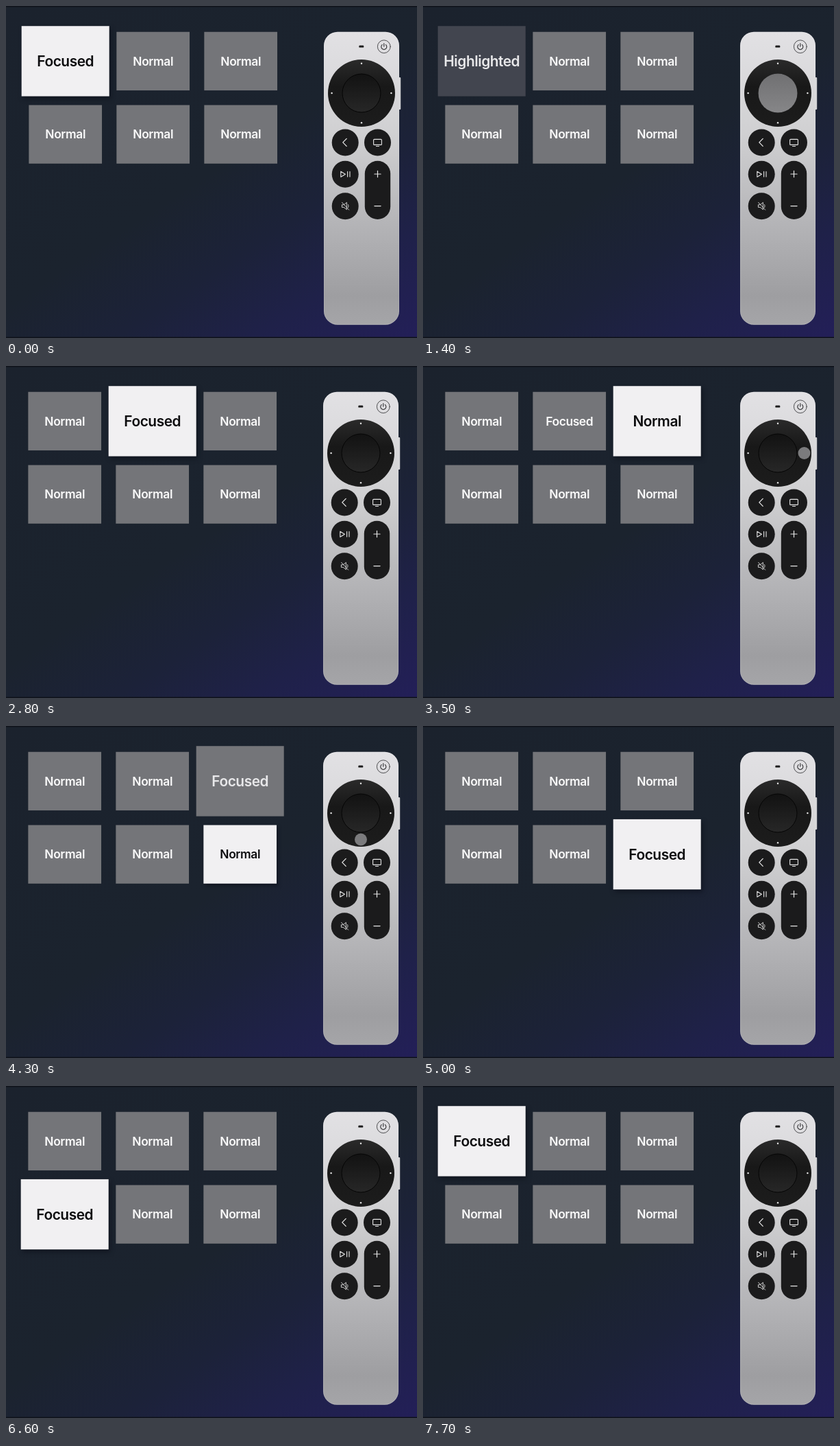
These frames come from a looping animation (600 px wide and 484 px high, 9300 ms). An HTML page:

```html
<!DOCTYPE html>
<html lang="en">
<head>
<meta charset="utf-8">
<title>Focus states</title>
<style>
  html, body { margin: 0; width: 100%; height: 100%; overflow: hidden; background: #1b232d; }
  svg { display: block; width: 600px; height: 484px; }
  text { font: 600 17.4px Inter, "Open Sans", sans-serif; letter-spacing: -.4px; text-anchor: middle; }
  .lit { filter: drop-shadow(2px 3px 2.5px rgba(5, 8, 18, .5)); }
  .icon { fill: none; stroke: #e6e6e6; stroke-width: 1.1; stroke-linecap: round; stroke-linejoin: round; }
</style>
</head>
<body>
<svg viewBox="0 0 600 484">
  <defs>
    <linearGradient id="bg" gradientUnits="userSpaceOnUse" x1="0" y1="0" x2="404" y2="613">
      <stop offset="0" stop-color="#1b222d"/>
      <stop offset=".5" stop-color="#1b232e"/>
      <stop offset=".67" stop-color="#1c2239"/>
      <stop offset=".82" stop-color="#1f2149"/>
      <stop offset="1" stop-color="#231f58"/>
    </linearGradient>
    <linearGradient id="metal" x2="0" y2="1">
      <stop offset="0" stop-color="#e2e1e4"/>
      <stop offset=".35" stop-color="#d0d0d2"/>
      <stop offset=".7" stop-color="#b0b0b3"/>
      <stop offset=".9" stop-color="#9e9ea1"/>
      <stop offset="1" stop-color="#a5a5a8"/>
    </linearGradient>
    <linearGradient id="ring" x2="0" y2="1">
      <stop offset="0" stop-color="#2a2a2a"/>
      <stop offset=".4" stop-color="#181818"/>
      <stop offset="1" stop-color="#1c1c1c"/>
    </linearGradient>
    <linearGradient id="pad" x2="0" y2="1">
      <stop offset="0" stop-color="#121212"/>
      <stop offset="1" stop-color="#272727"/>
    </linearGradient>
    <linearGradient id="press" x2="0" y2="1">
      <stop offset="0" stop-color="#707072"/>
      <stop offset="1" stop-color="#868688"/>
    </linearGradient>
  </defs>
  <rect width="600" height="484" fill="url(#bg)"/>
  <path d="M0 .7H600M0 483.3H600" stroke="#0f121a" stroke-width="1.4"/>
  <g id="scene">
    <g id="grid"></g>
    <g id="remote">
      <rect x="571" y="104" width="4.2" height="47" rx="1" fill="#d4d4d7"/>
      <rect x="463" y="37.7" width="110" height="427" rx="20" fill="url(#metal)"/>
      <rect x="463.4" y="38.1" width="109.2" height="426.2" rx="19.6" fill="none" stroke="#fff" stroke-opacity=".2" stroke-width=".8"/>
      <rect x="514.3" y="57.6" width="7" height="3" rx="1.2" fill="#1c1c1c"/>
      <g fill="none" stroke="#2a2a2c" stroke-linecap="round">
        <circle cx="550.8" cy="59.2" r="9.4" stroke-width=".8"/>
        <path d="M548.2 56.4a4 4 0 1 0 5.2 0M550.8 54.6v4.4" stroke-width="1.1"/>
      </g>
      <circle cx="518" cy="127" r="49" fill="url(#ring)"/>
      <circle cx="518" cy="127" r="28" fill="url(#pad)" stroke="#050505"/>
      <g fill="#e8e8e8">
        <circle cx="518" cy="83.8" r="1.2"/><circle cx="518" cy="170.2" r="1.2"/>
        <circle cx="474.6" cy="127" r="1.2"/><circle cx="561.4" cy="127" r="1.2"/>
      </g>
      <g fill="#1b1b1c">
        <circle cx="494.2" cy="199" r="19.5"/><circle cx="541.5" cy="199" r="19.5"/>
        <circle cx="494.2" cy="245.3" r="19.5"/><circle cx="494.2" cy="291.8" r="19.5"/>
        <rect x="522.8" y="225.8" width="37.4" height="85.2" rx="18.7"/>
      </g>
      <g class="icon">
        <path d="M496.2 193.4l-5.4 5.5 5.4 5.5" stroke-width="1.3"/>
        <path d="M536.6 194.4h9.8q1 0 1 1v6q0 1-1 1h-9.8q-1 0-1-1v-6q0-1 1-1zM539.4 204.5h4.2"/>
        <path d="M487.8 241.2v8l6.6-4zM497.6 241.4v7.6M501 241.4v7.6"/>
        <path d="M536.9 245h9.2M541.5 240.4v9.2M536.9 291.6h9.2" stroke-width="1.2"/>
        <path d="M489.8 289.8h2.4l4.2-3.4v10.4l-4.2-3.4h-2.4zM489.6 286.4l10 10.8M498.6 289.6q1 2 0 4" stroke-width=".9"/>
      </g>
    </g>
    <circle id="click" cx="518" cy="127" r="28.5" fill="url(#press)"/>
    <circle id="tap" r="9" fill="#7b7b7d"/>
  </g>
</svg>
<script>
const LOOP = 9300;
const GREY = '#747579', WHITE = '#f1f0f2';
const $ = id => document.getElementById(id);

// Each move: start, time the labels catch up, from cell, to cell
const moves = [
  [2500, 2800, 0, 1],
  [3400, 3800, 1, 2],
  [4300, 4600, 2, 5],
  [5200, 5500, 5, 4],
  [6200, 6600, 4, 3],
  [7400, 7700, 3, 0]
];

const col = i => i % 3, row = i => Math.floor(i / 3);

function add(parent, tag, attrs) {
  const el = document.createElementNS('http://www.w3.org/2000/svg', tag);
  for (const k in attrs) el.setAttribute(k, attrs[k]);
  return parent.appendChild(el);
}

const cells = Array.from({ length: 6 }, (_, i) => {
  const g = add($('grid'), 'g', {});
  const box = add(g, 'rect', { x: -53.35, y: -42.65, width: 106.7, height: 85.3 });
  const label = add(g, 'text', { y: 6.2 });
  return { g, box, label, x: 85.7 + 128 * col(i), y: 80.4 + 106.7 * row(i) };
});

function paint(cell, text, big, fill, ink) {
  cell.g.setAttribute('transform', `translate(${cell.x} ${cell.y}) scale(${big ? 1.2 : 1})`);
  cell.box.setAttribute('fill', fill);
  cell.box.setAttribute('class', fill === WHITE ? 'lit' : '');
  cell.label.setAttribute('fill', ink);
  if (cell.label.textContent !== text) cell.label.textContent = text;
}

const show = (el, on) => el.setAttribute('visibility', on ? 'visible' : 'hidden');

function render(t) {
  const move = moves.filter(m => t >= m[0]).pop();
  const [start, settle, from, to] = move || [0, 0, 0, 0];
  const moving = t < settle;
  const lag = moving && t < start + 100;   // colours swap before sizes do
  const pressed = t >= 1400 && t < 1900;
  const labelled = moving ? from : to;
  const large = lag ? from : to;

  cells.forEach((cell, i) => {
    const lit = i === to;
    const text = i === labelled ? (pressed ? 'Highlighted' : 'Focused') : 'Normal';
    const fill = !lit ? GREY : pressed ? '#42454f' : WHITE;
    const ink = lit && !pressed ? '#0c0c0e' : i === large ? '#e8e8ea' : '#fafafa';
    paint(cell, text, i === large, fill, ink);
  });

  show($('click'), pressed);
  show($('tap'), moving);
  $('tap').setAttribute('cx', 518 + 38.5 * (col(to) - col(from)));
  $('tap').setAttribute('cy', 127 + 38.5 * (row(to) - row(from)));

  const drift = Math.max(0, 1 - Math.floor(t / 100) / 5);
  $('scene').setAttribute('transform', `translate(${drift} 0)`);
}

const t0 = performance.now();
function tick() {
  render((performance.now() - t0) % LOOP);
  requestAnimationFrame(tick);
}
tick();
</script>
</body>
</html>
```
